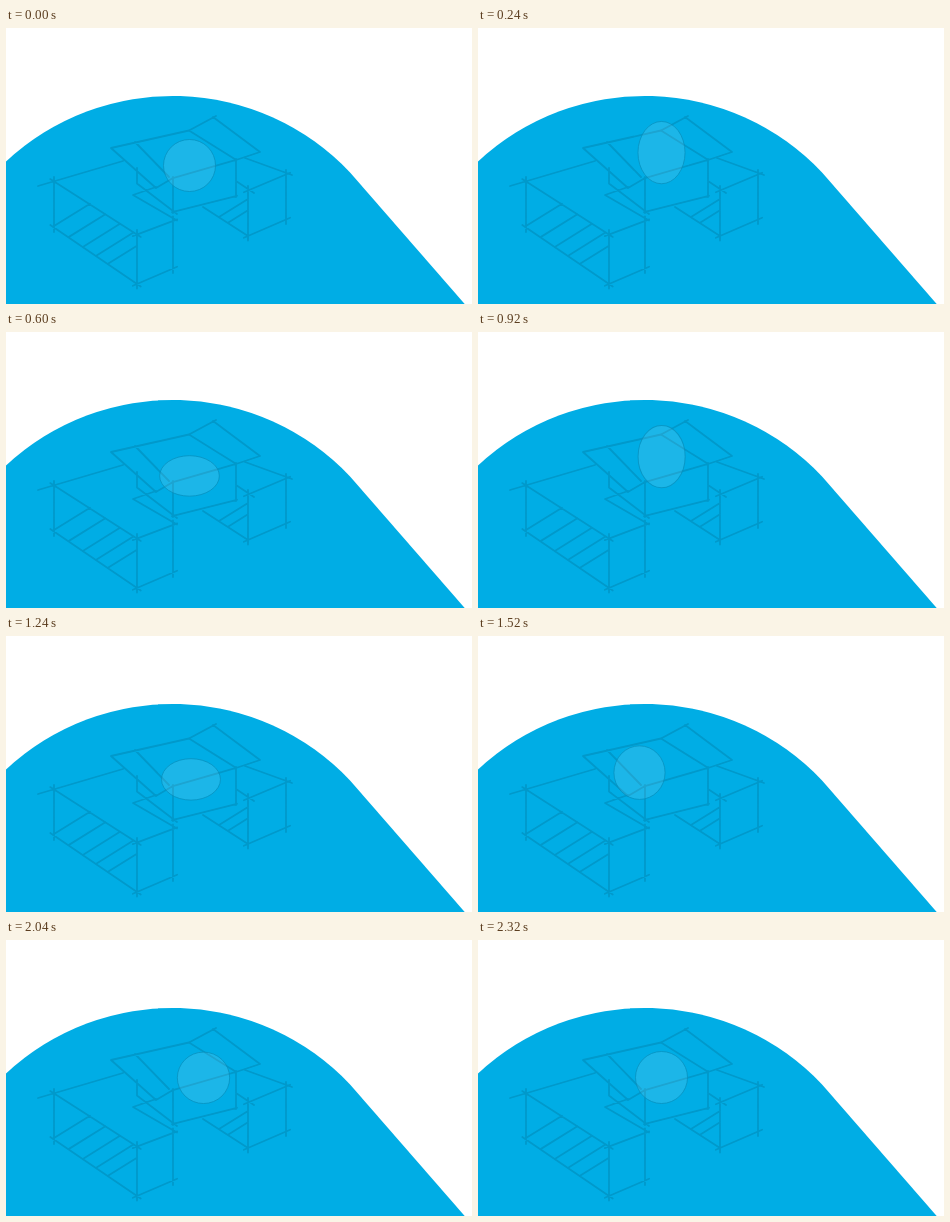
An HTML page that plays this animation: 466 px wide and 276 px high, repeating every 2.4 s.

```html
<!DOCTYPE html>
<html lang="en">
<head>
<meta charset="utf-8">
<title>Bouncing ball</title>
<style>
  html, body { margin: 0; width: 100%; height: 100%; overflow: hidden; background: #fff; }
  svg { display: block; width: 466px; height: 276px; }
</style>
</head>
<body>
<svg viewBox="0 0 466 276">
  <path fill="#00ade5" d="M0 133.6A244 244 0 0 1 344.3 144.7L458.7 276H0Z"/>
  <path id="house" fill="none" stroke="#0099cb" stroke-width="1.8" stroke-linecap="round" stroke-linejoin="round"/>
  <ellipse id="ball" fill="#fff" fill-opacity=".11" stroke="#078fbd" stroke-opacity=".75"/>
</svg>
<script>
const LOOP = 2400, STEP = 40, R = 26, REST_X = 183.5, FLOOR = 163.5;
const house = document.getElementById('house');
const ball = document.getElementById('ball');

// Line whose ends run past its corners, as in a hand sketch.
function line(x1, y1, x2, y2, over = 4.5) {
  const k = over / Math.hypot(x2 - x1, y2 - y1);
  const dx = (x2 - x1) * k, dy = (y2 - y1) * k;
  return `M${x1 - dx} ${y1 - dy}L${x2 + dx} ${y2 + dy}`;
}

// Wall between two top corners, with the height at each one.
const wall = (x1, y1, x2, y2, h1, h2, over) =>
  line(x1, y1, x2, y2, over) + line(x1, y1 + h1, x2, y2 + h2, over) +
  line(x1, y1, x1, y1 + h1, over) + line(x2, y2, x2, y2 + h2, over);

// Treads rise from a sloping edge and stop at the wall on the right.
function stairs(count, x, y, gap, slope, run, right) {
  let d = '';
  for (let i = 0; i < count; i++) {
    const dx = i * gap - 0.6 * i * i;
    const x1 = x + dx, y1 = y + slope * dx, w = Math.min(run, right - x1);
    d += line(x1, y1, x1 + w, y1 - 0.62 * w, 0);
  }
  return d;
}

house.setAttribute('d',
  wall(48, 153.5, 131, 206.5, 46, 49.5) +
  wall(131, 206.5, 167, 193, 49.5, 47.5) +
  wall(242, 162.5, 280, 146.5, 45.5, 45) +
  wall(167, 150, 230, 132, 34, 36, 1) +
  stairs(5, 48, 198, 16, 0.69, 36, 131) +
  stairs(2, 213, 189, 9.6, 0.63, 29, 242) +
  'M150 160L105 120L183 102.5L229.5 131.5M129 114L163 149M150 160L167 150M230 132L254 124L207 89M183 102.5L210 88' +
  'M131 140V155.5L171 186M150 159L127 167L171 192.5M32 158L117 133M239 130L286 147M230 153L248 165M197 179L242 208');

// Lift (0..1) and stretch of a jump, d ms from its peak.
function jump(d) {
  const w = Math.abs(d), squash = d < 0 ? 120 : 180;
  return {
    lift: w < 145 ? Math.cos(Math.PI * w / 290) ** 2 : 0,
    stretch: w < 160 ? 0.28 * Math.sin(Math.PI * w / 160)
      : w < 160 + squash ? -0.225 * Math.sin(Math.PI * (w - 160) / squash) : 0
  };
}

// Two high jumps, then two small and quicker hops.
const jumps = [
  { peak: 360, height: 100, power: 1, speed: 1 },
  { peak: 1040, height: 100, power: 1, speed: 1 },
  { peak: 1400, height: 5, power: 0.35, speed: 1.2 },
  { peak: 1900, height: 5, power: 0.35, speed: 1.2 }
];

// Sideways moves: start time and distance.
const moves = [[880, 1.5], [1250, -23.5], [1780, 36], [2080, -14]];
const MOVE_TIME = 240;

function draw(now) {
  const t = Math.floor(now % LOOP / STEP) * STEP;
  let x = REST_X, lift = 0, stretch = 0, tilt = 0;
  for (const { peak, height, power, speed } of jumps) {
    const j = jump((t - peak) * speed);
    lift += height * j.lift;
    stretch += power * j.stretch;
  }
  for (const [start, dist] of moves) {
    const u = Math.min(1, Math.max(0, (t - start) / MOVE_TIME));
    x += dist * u * u * (3 - 2 * u);
    tilt += 0.3 * dist * Math.sin(Math.PI * u);
  }
  const ry = R * (1 + stretch), rx = R * (1 + stretch) ** -0.55;
  const y = FLOOR - 3 * stretch - lift - ry;
  ball.setAttribute('rx', rx);
  ball.setAttribute('ry', ry);
  ball.setAttribute('transform', `translate(${x} ${y}) rotate(${tilt})`);
}

const start = performance.now();
function tick() {
  draw(performance.now() - start);
  requestAnimationFrame(tick);
}
tick();
</script>
</body>
</html>
```
